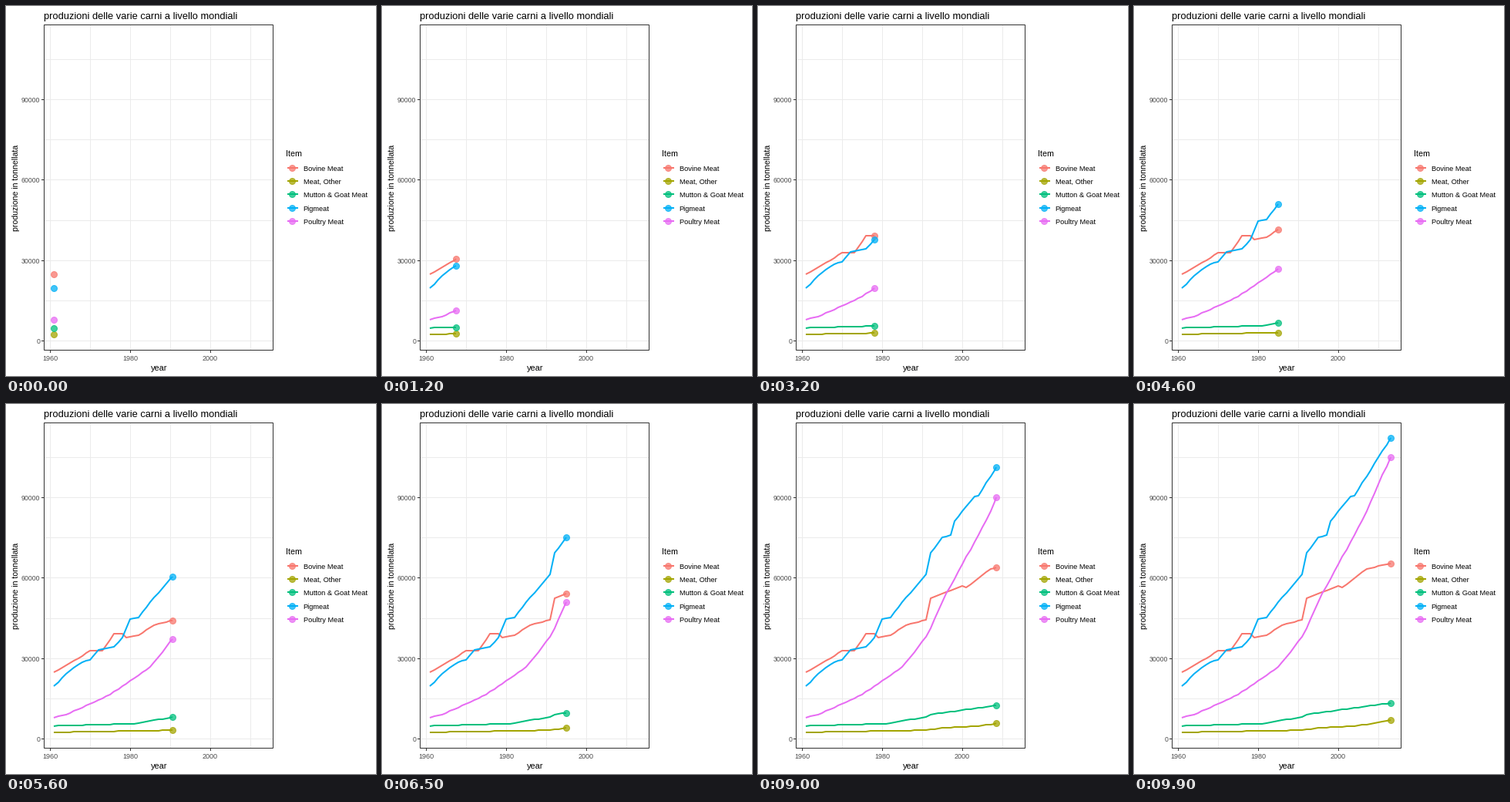
A matplotlib script for the animation above (10000 ms loop, 480x480 px).

```python
import numpy as np
import matplotlib.pyplot as plt
from matplotlib.animation import FuncAnimation
from matplotlib.patches import Circle, Rectangle

SIZE, FRAMES, INTERVAL = 480, 100, 100
FIRST, LAST = 1961, 2013
GRID, BORDER, TICK_TEXT = "#EBEBEB", "#333333", "#4D4D4D"
ALPHA = 0.75

plt.rcParams["font.family"] = "Liberation Sans"

# name, colour, turning points as (years since FIRST, thousands)
SERIES = [
    ("Bovine Meat", "#F8766D", [
        (0, 24.7), (9, 32.7), (12, 32.9), (15, 39), (17, 39), (18, 37.8),
        (21, 38.6), (25, 42.4), (30, 44.3), (31, 52.4), (39, 56.9),
        (40, 56.4), (46, 63.2), (52, 65.4)]),
    ("Meat, Other", "#A3A500", [
        (0, 2.35), (30, 3.15), (34, 4), (44, 4.8), (52, 6.9)]),
    ("Mutton & Goat Meat", "#00BF7D", [
        (0, 4.75), (20, 5.6), (30, 8.1), (31, 9), (52, 13.3)]),
    ("Pigmeat", "#00B0F6", [
        (0, 19.6), (3, 24.2), (7, 28.6), (9, 29.3), (11, 33), (15, 34.3),
        (17, 37.7), (19, 44.6), (21, 45.3), (24, 50.9), (30, 61.4),
        (31, 69.2), (34, 75), (36, 75.8), (37, 81), (42, 90.4), (43, 90.6),
        (52, 112.1)]),
    ("Poultry Meat", "#E76BF3", [
        (0, 7.9), (3, 8.9), (14, 16.4), (24, 26.7), (30, 38), (35, 54.2),
        (45, 81.5), (52, 105)]),
]


def px(year):
    return 62.8 + 5.2 * (year - FIRST)


def py(value):
    return 434.6 - 3.478 * value


def mid(v):
    """Centre of the pixel that holds v."""
    return np.floor(v) + 0.5


fig = plt.figure(figsize=(SIZE / 72, SIZE / 72), dpi=72, facecolor="white")
ax = fig.add_axes([0, 0, 1, 1])
ax.set(xlim=(0, SIZE), ylim=(SIZE, 0))
ax.axis("off")


def stroke(xs, ys, color, width=1, z=1):
    return ax.plot(xs, ys, color=color, lw=width, zorder=z, snap=False,
                   solid_capstyle="butt", solid_joinstyle="round")[0]


def dot(x, y, color):
    """Translucent disc whose outline overlaps its fill."""
    parts = [Circle((x, y), 4, fc=color, ec="none"),
             Circle((x, y), 4, fc="none", ec=color, lw=1)]
    for part in parts:
        part.set(alpha=ALPHA, zorder=4, snap=False)
        ax.add_patch(part)
    return parts


def label(x, y, text, size, color="black", ha="left", **kw):
    ax.text(x, y, text, size=size, color=color, ha=ha, va="baseline", **kw)


# panel
for year in range(1960, 2011, 10):
    x = mid(px(year))
    stroke([x, x], [25, 446], GRID)
    if year % 20 == 0:
        stroke([x, x], [447, 450], BORDER)
        label(x - 0.5, 460, str(year), 9, TICK_TEXT, "center")
for value in range(0, 106, 15):
    y = mid(py(value))
    stroke([50, 346], [y, y], GRID)
    if value % 30 == 0:
        stroke([46, 49], [y, y], BORDER)
        label(44, y + 3.5, str(value * 1000), 8.7, TICK_TEXT, "right")
ax.add_patch(Rectangle((49.5, 24.5), 297, 422, fc="none", ec=BORDER, lw=1,
                       zorder=5, snap=False))

label(49, 17, "produzioni delle varie carni a livello mondiali", 12.85)
label(198.7, 473, "year", 11, ha="center")
label(16, 235.5, "produzione in tonnellata", 10.5, ha="center",
      rotation=90, rotation_mode="anchor")

# legend
label(362.5, 195, "Item", 10.6)
for k, (name, color, _) in enumerate(SERIES):
    y = np.floor(210.2 + 17.28 * k)
    stroke([365, 379], [y, y], color, 2, 2)
    dot(371.5, y + 0.5, color)
    label(385.6, y + 4, name, 9.3)

# curves
years = np.arange(FIRST, LAST + 1)
keys = np.rint((years - FIRST) * (FRAMES - 1) / (LAST - FIRST))
curves = [stroke([], [], color, 2, 3) for _, color, _ in SERIES]
heads = [dot(0, 0, color) for _, color, _ in SERIES]


def update(i):
    now = np.interp(i, keys, years)
    shown = np.append(years[years < now], now)
    for (_, _, knots), curve, head in zip(SERIES, curves, heads):
        ys = py(np.interp(shown - FIRST, *zip(*knots)))
        curve.set_data(np.floor(px(shown)), np.floor(ys))
        for part in head:
            part.set_center((mid(px(now)), mid(ys[-1])))
    return curves + [part for head in heads for part in head]


anim = FuncAnimation(fig, update, frames=FRAMES, interval=INTERVAL,
                     repeat=True, repeat_delay=0, blit=False)
plt.show()
```
